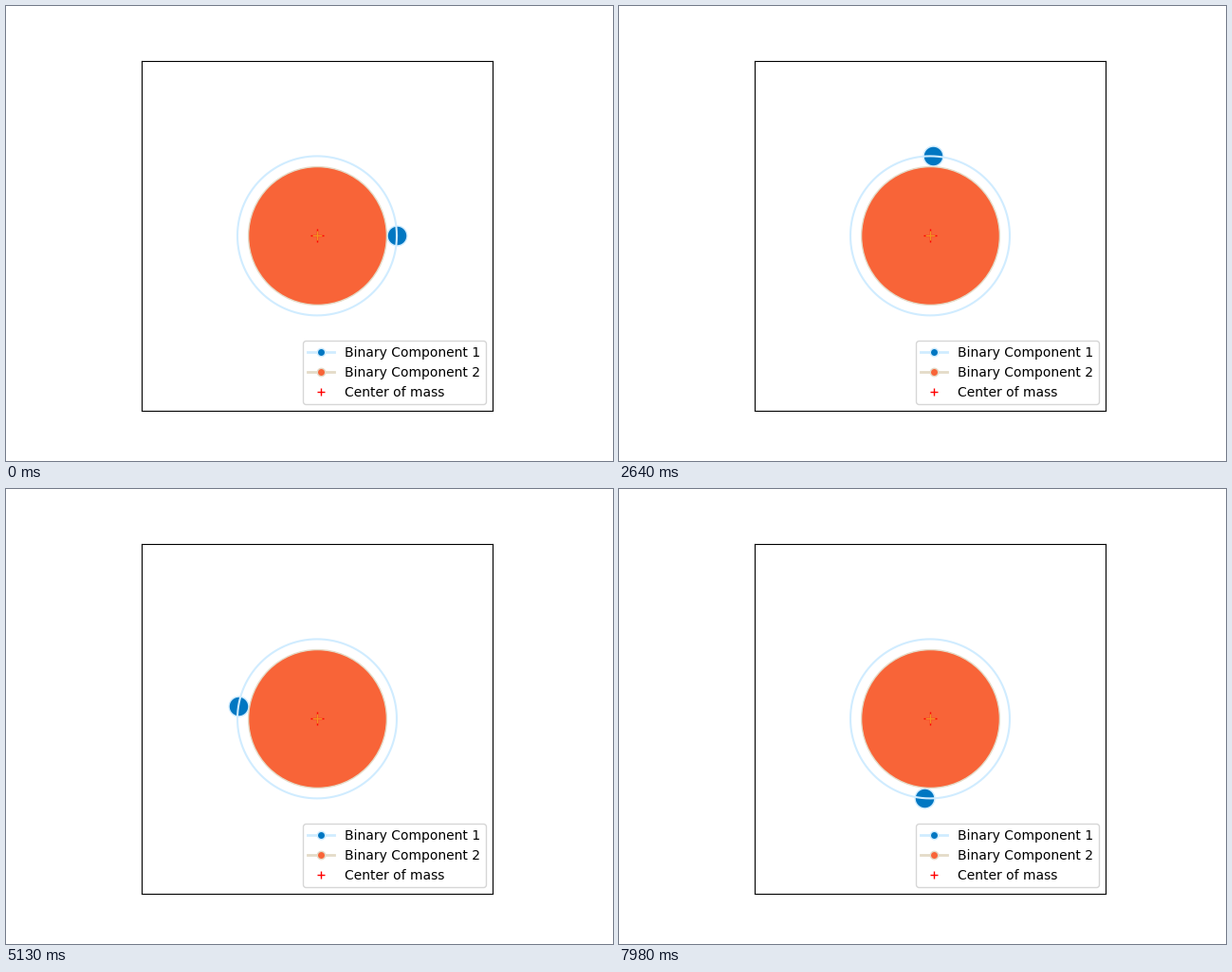
Recreate the animation shown at these times as a matplotlib script. Size 640x480 px, loop 8000 ms.

```python
import numpy as np
import matplotlib.pyplot as plt
from matplotlib.animation import FuncAnimation
from matplotlib.lines import Line2D

LOOP = 8000      # ms
INTERVAL = 25    # ms per drawn frame
STEP = 30        # ms per degree of orbit
LIMIT = 2.2

BLUE, PALE_BLUE = "#0077c2", "#d0ecff"
ORANGE, BEIGE = "#f86438", "#e4dbc8"

fig, ax = plt.subplots(figsize=(6.4, 4.8), dpi=100)
ax.set(xlim=(-LIMIT, LIMIT), ylim=(-LIMIT, LIMIT), xticks=[], yticks=[])
ax.set_aspect("equal")


def body(size, color, edge, z):
    return ax.plot([0], [0], "o", ms=size, mfc=color, mec=edge, zorder=z)[0]


def key(color, edge, label):
    return Line2D([], [], color=edge, lw=2, marker="o", mfc=color, mec=edge,
                  label=label)


small = body(15, BLUE, PALE_BLUE, 2)
large = body(105, ORANGE, BEIGE, 2.1)

phi = np.linspace(0, 2 * np.pi, 361)
ax.plot(np.cos(phi), np.sin(phi), color=PALE_BLUE, lw=1.5, zorder=2.2)

# centre of mass, with the tiny orbit of the heavy body over it
ax.plot([0], [0], "+", color="red", ms=10, zorder=2.3)
ax.plot([0], [0], "+", color="#f29222", ms=7, zorder=2.4)

ax.legend(
    handles=[
        key(BLUE, PALE_BLUE, "Binary Component 1"),
        key(ORANGE, BEIGE, "Binary Component 2"),
        Line2D([], [], ls="none", marker="+", color="red",
               label="Center of mass"),
    ],
    loc="lower right",
)


def update(i):
    degrees = (i * INTERVAL + INTERVAL - 1) // STEP
    angle = np.radians(degrees)
    small.set_data([np.cos(angle)], [np.sin(angle)])
    return (small,)


anim = FuncAnimation(fig, update, frames=LOOP // INTERVAL, interval=INTERVAL,
                     repeat=True, repeat_delay=0, blit=False)
plt.show()
```
